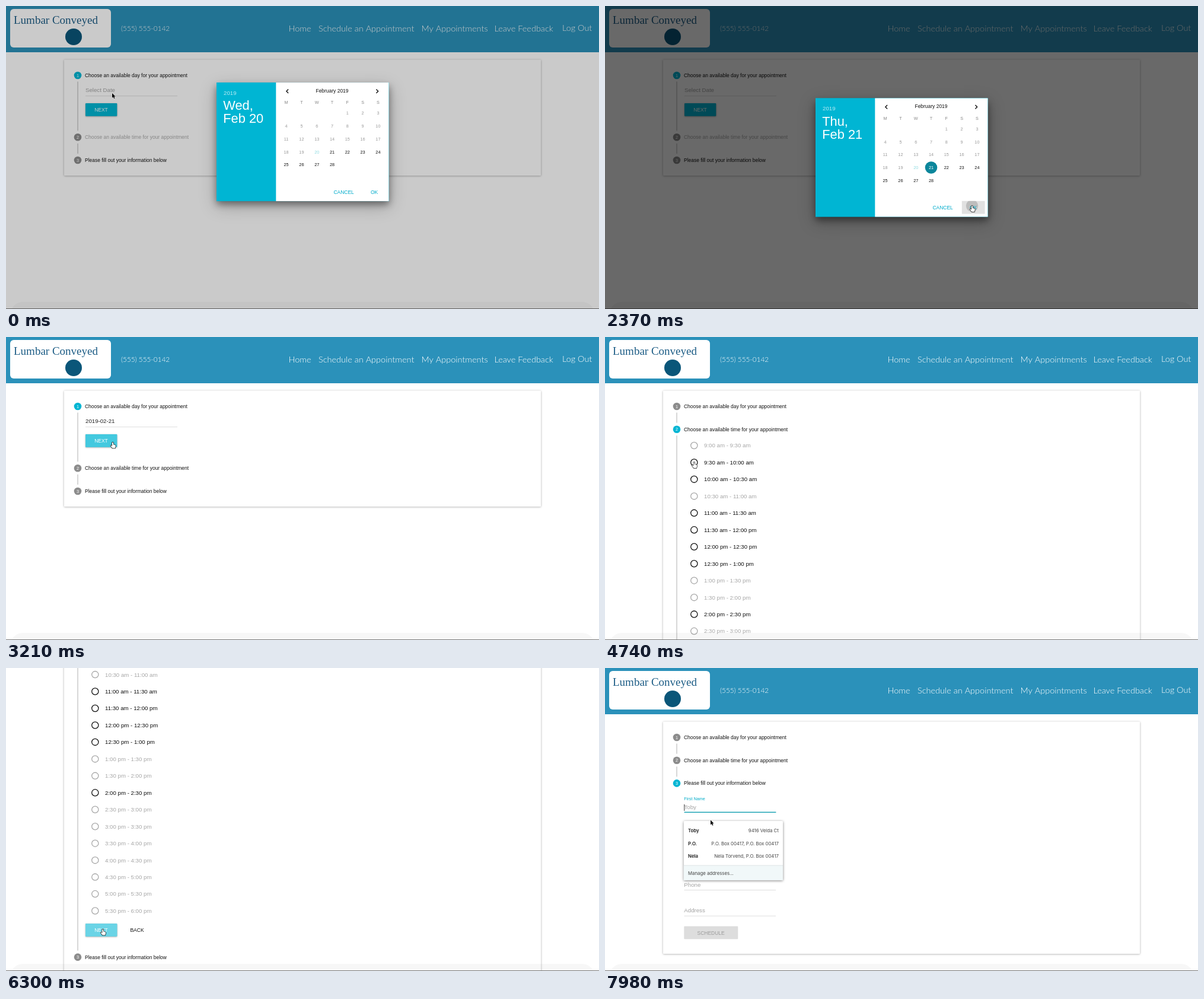
An HTML page with a canvas for the animation above (8 s loop, 1000x511 px).

```html
<!DOCTYPE html>
<html lang="en">
<head>
<meta charset="utf-8">
<title>Appointment booking</title>
<style>
html, body { margin: 0; width: 100%; height: 100%; overflow: hidden; background: #fff; }
canvas { display: block; width: 100%; height: 100%; }
</style>
</head>
<body>
<canvas id="stage" width="1000" height="511"></canvas>
<script>
const ctx = document.getElementById('stage').getContext('2d');
const LOOP = 8000;
const SANS = '"Liberation Sans", Arial, sans-serif';
const NAV = 'Lato, sans-serif';
const SERIF = '"Liberation Serif", serif';
const POPUP = 'Inter, sans-serif';
const CYAN = '#00b5d3', BAR = '#2b91ba', BLACK = '#111', HINT = '#a2a2a2', RULE = '#dedede';
const SMALL = 7.27, BODY = 8.47, LARGE = 9.69;

// Moments of the interaction, in ms
const OPEN = -34, PICK_DAY = 1290, CONFIRM = 2310, CLOSE = 2430;
const TO_TIMES = 3300, PICK_TIME = 4970, TO_FORM = 6330, FOCUS = 7590, SUGGEST = 7700;

const clamp = v => Math.max(0, Math.min(1, v));
const lerp = (a, b, k) => a + (b - a) * k;
const smooth = k => k * k * (3 - 2 * k);

// cubic-bezier(.23, 1, .32, 1)
function easeOut(x) {
  x = clamp(x);
  let lo = 0, hi = 1;
  for (let i = 0; i < 20; i++) {
    const s = (lo + hi) / 2, r = 1 - s;
    if (3 * r * r * s * .23 + 3 * r * s * s * .32 + s * s * s < x) lo = s; else hi = s;
  }
  return 1 - (1 - lo) ** 3;
}
const since = (t, start, length = 450) => easeOut((t - start) / length);

function text(str, x, middle, size, color = BLACK, { align = 'left', font = SANS, weight = 400 } = {}) {
  ctx.font = `${weight} ${size}px ${font}`;
  ctx.textAlign = align;
  ctx.fillStyle = color;
  ctx.fillText(str, x, middle + size * .355);
}
const centered = (str, x, y, size, color) => text(str, x, y, size, color, { align: 'center' });

function rect(x, y, w, h, color) {
  ctx.fillStyle = color;
  ctx.fillRect(x, y, w, h);
}
function round(x, y, w, h, r, color) {
  ctx.beginPath();
  ctx.roundRect(x, y, w, h, r);
  ctx.fillStyle = color;
  ctx.fill();
}
function disc(x, y, r, color) {
  ctx.beginPath();
  ctx.arc(x, y, r, 0, 7);
  ctx.fillStyle = color;
  ctx.fill();
}
function shadowed(dy, blur, color, draw) {
  ctx.save();
  ctx.shadowOffsetY = dy;
  ctx.shadowBlur = blur;
  ctx.shadowColor = color;
  draw();
  ctx.restore();
}
function clipped(x, y, w, h, draw) {
  ctx.save();
  ctx.beginPath();
  ctx.rect(x, y, w, h);
  ctx.clip();
  draw();
  ctx.restore();
}

function header() {
  rect(0, 0, 1000, 78, BAR);
  round(7, 5, 170, 65, 6, '#fff');
  text('Lumbar Conveyed', 13, 23.5, 19, '#1d5d86', { font: SERIF });
  disc(114, 52, 14, '#0a5679');
  text('(555) 555-0142', 194, 37.8, 11.8, '#fff', { font: NAV, weight: 300 });
  const links = [['Home', 476.5, 38], ['Schedule an Appointment', 527, 38], ['My Appointments', 700.5, 38],
    ['Leave Feedback', 823.5, 38], ['Log Out', 938, 37.2]];
  for (const [label, x, y] of links) text(label, x, y, 14.5, '#fff', { font: NAV, weight: 300 });
}

function badge(n, y, active) {
  disc(121, y, 6.3, active ? CYAN : '#8c8c8c');
  centered(n, 121, y, SMALL, '#fff');
}

function nextButton(y, hover) {
  shadowed(.8, 2.5, 'rgba(0,0,0,.35)', () => round(134, y - 11, 53.3, 21.8, 1, CYAN));
  round(134, y - 11, 53.3, 21.8, 1, `rgba(255,255,255,${.43 * hover})`);
  centered('NEXT', 160.5, y, BODY, '#fff');
}

function dayStep(t, y) {
  const chosen = t >= CLOSE;
  text(chosen ? '2019-02-21' : 'Select Date', 134, y + 25, LARGE, chosen ? '#222' : HINT);
  rect(134, y + 34.2, 155, 1, RULE);
  nextButton(y + 58, since(t, 3135));
}

function slotName(i) {
  const clock = n => {
    const hour = 9 + (n >> 1);
    return `${(hour - 1) % 12 + 1}:${n % 2 ? '30' : '00'} ${hour < 12 ? 'am' : 'pm'}`;
  };
  return `${clock(i)} - ${clock(i + 1)}`;
}

function timeStep(t, top) {
  const free = [1, 2, 4, 5, 6, 7, 10];
  for (let i = 0; i < 18; i++) {
    const y = top + 27.3 + i * 28.46;
    const checked = i === 1 && t >= PICK_TIME;
    const color = free.includes(i) ? '#0c0c0c' : '#a6a6a6';
    if (checked) {
      const k = since(t, PICK_TIME);
      disc(150.3, y, 14.5 * k, `rgba(0,181,211,${.3 * (1 - k)})`);
      disc(150.3, y, 3 * k, CYAN);
    }
    ctx.beginPath();
    ctx.arc(150.3, y, 5.6, 0, 7);
    ctx.lineWidth = 1.3;
    ctx.strokeStyle = checked ? CYAN : color;
    ctx.stroke();
    text(slotName(i), 167, y, LARGE, color);
  }
  nextButton(top + 543.5, since(t, 6080));
  centered('BACK', 221, top + 544, BODY, BLACK);
}

function formStep(t, top) {
  const focus = since(t, FOCUS);
  ['First Name', 'Last Name', 'Email', 'Phone', 'Address'].forEach((label, i) => {
    const y = top + 40 + i * 43.65;
    const up = i ? 0 : focus;
    text(label, 133.3, y - 13.8 * up, lerp(LARGE, SMALL, up), up > 0 ? '#00acc8' : HINT);
    rect(133.5, y + 8.7, 154.7, 1, RULE);
  });
  if (focus > 0) {
    const y = top + 40;
    ctx.globalAlpha = focus;
    text('Toby', 133.5, y, LARGE, HINT);
    ctx.globalAlpha = 1;
    rect(133.3, y - 4.5, 1, 11, '#333');
    rect(211 - 77.4 * focus, y + 8.2, 154.8 * focus, 1.4, '#12a0b2');
  }
  round(133.3, top + 241, 91, 21.8, 1, '#dddddd');
  centered('SCHEDULE', 178.6, top + 252.2, BODY, '#9b9b9b');
}

function suggestions() {
  shadowed(1, 4, 'rgba(0,0,0,.5)', () => round(132.8, 258, 167.2, 99.8, 1.5, '#fff'));
  const rows = [['Toby', '9416 Velda Ct'], ['P.O.', 'P.O. Box 00417, P.O. Box 00417'], ['Nela', 'Nela Torvend, P.O. Box 00417']];
  rows.forEach(([name, address], i) => {
    const y = 274 + i * 21.8;
    text(name, 140, y, 7.8, '#1c1c1c', { font: POPUP, weight: 600 });
    text(address, 292.8, y, 7.8, '#444', { font: POPUP, align: 'right' });
  });
  rect(132.8, 333, 167.2, 24.8, '#f1f8f9');
  rect(132.8, 332.6, 167.2, .8, '#d8dddf');
  text('Manage addresses…', 140, 346, 7.8, '#444', { font: POPUP });
}

function page(t) {
  const times = since(t, TO_TIMES), form = since(t, TO_FORM);
  const step = t < TO_TIMES ? 1 : t < TO_FORM ? 2 : 3;
  const heights = [65.6 * (1 - times), 550.5 * times * (1 - form), 261.6 * form];
  const tops = [117];
  for (let i = 0; i < 2; i++) tops.push(tops[i] + 38.7 + heights[i]);
  const bottom = tops[2] + 26 + heights[2];
  const wanted = 257.4 * smooth(clamp((t - 5200) / 620));
  const scroll = Math.min(wanted, Math.max(0, bottom - 513.6));

  ctx.save();
  ctx.translate(0, -scroll);
  header();
  shadowed(.6, 3.5, 'rgba(0,0,0,.36)', () => round(98, 90.6, 804, bottom - 90.6, 1, '#fff'));
  for (let i = 0; i < 2; i++) rect(120.4, tops[i] + 10.5, 1.3, tops[i + 1] - tops[i] - 21.5, '#c2c2c2');

  const labels = ['Choose an available day for your appointment', 'Choose an available time for your appointment',
    'Please fill out your information below'];
  const contents = [dayStep, timeStep, formStep];
  tops.forEach((y, i) => {
    badge(i + 1, y, step === i + 1);
    text(labels[i], 133, y, BODY, i === 1 && t < CLOSE ? '#a8a8a8' : BLACK);
    if (heights[i] > .5) clipped(128, y + 12, 770, heights[i] + 6, () => contents[i](t, y));
  });
  if (t >= SUGGEST) suggestions();
  ctx.restore();
}

function chevron(x, y, dir) {
  ctx.beginPath();
  ctx.moveTo(x - dir * 1.6, y - 3.2);
  ctx.lineTo(x + dir * 1.6, y);
  ctx.lineTo(x - dir * 1.6, y + 3.2);
  ctx.lineWidth = 1.4;
  ctx.strokeStyle = '#111';
  ctx.stroke();
}

function calendar(t) {
  const box = () => rect(355, 155.5, 290.5, 200, CYAN);
  shadowed(8.5, 27, 'rgba(0,0,0,.25)', box);
  shadowed(6, 11, 'rgba(0,0,0,.4)', box);
  rect(455.3, 155.5, 190.2, 200, '#fff');

  const picked = t >= PICK_DAY;
  text('2019', 367, 172.5, LARGE, 'rgba(255,255,255,.72)');
  text(picked ? 'Thu,' : 'Wed,', 366.3, 194, 21.8, '#fff');
  text(picked ? 'Feb 21' : 'Feb 20', 366.3, 216, 21.8, '#fff');

  chevron(474.5, 170.2, -1);
  chevron(626, 170.2, 1);
  centered('February 2019', 550, 169.3, BODY, BLACK);

  const columnX = c => 472.6 + 25.8 * c;
  [...'MTWTFSS'].forEach((d, c) => centered(d, columnX(c), 189, SMALL, '#858585'));
  for (let day = 1; day <= 28; day++) {
    const cell = day + 3, x = columnX(cell % 7), y = 207.3 + 21.75 * Math.floor(cell / 7);
    let color = day < 20 ? '#999' : day === 20 ? '#8fdce2' : BLACK;
    if (day === 21 && t > 1000) {
      disc(x, y, 10.3, `rgba(12,134,155,${picked ? 1 : .62 * since(t, 1000)})`);
      color = '#fff';
    }
    centered(day, x, y, SMALL, color);
  }

  if (t > 2130) {
    rect(601.8, 328.8, 38.8, 21.8, `rgba(0,0,0,${.12 * since(t, 2130)})`);
    if (t > CONFIRM) clipped(601.8, 328.8, 38.8, 21.8, () =>
      disc(619, 337, Math.min(26, (t - CONFIRM) / 6), 'rgba(0,0,0,.16)'));
  }
  centered('CANCEL', 569.6, 340, BODY, '#00accb');
  centered('OK', 621, 340, BODY, '#00accb');
}

function dialog(t) {
  const visible = 1 - since(t, CLOSE);
  if (visible < .004) return;
  rect(0, 0, 1000, 511, `rgba(0,0,0,${.59 * since(t, OPEN, 400) * visible})`);
  ctx.save();
  ctx.globalAlpha = visible;
  ctx.translate(0, -38.7 * (1 - since(t, OPEN)));
  calendar(t);
  ctx.restore();
}

function bottomEdge() {
  round(8, 499, 984, 40, 26, 'rgba(0,0,0,.03)');
  rect(0, 510, 1000, 1, '#777');
}

// Pointer stops: time, x, y
const STOPS = [[0, 179, 147], [330, 179, 147], [1050, 552, 268], [1560, 552, 268], [2190, 619, 337], [2520, 619, 337],
  [3160, 180, 177.5], [4200, 180, 177.5], [4730, 150.3, 211], [5280, 150.3, 211], [6130, 163.3, 440.5],
  [6580, 163.3, 440.5], [7330, 193, 237], [7690, 193, 237], [7960, 178, 256.5], [LOOP, 178, 256.5]];
const SHAPES = [[0, 'arrow'], [990, 'hand'], [1620, 'arrow'], [2110, 'hand'], [2600, 'arrow'], [3110, 'hand'],
  [3600, 'arrow'], [4660, 'hand'], [5300, 'arrow'], [6070, 'hand'], [6450, 'arrow'], [7380, 'beam'], [7760, 'arrow']];
const POINTERS = {
  arrow: [new Path2D('M0 0V8L1.9 6.3L3.2 9.2L4.5 8.6L3.2 5.8H5.6Z'), '#000', '#fff', .6],
  hand: [new Path2D('M-1 .5Q0-.6 1 .5V3.8L4.3 4.8Q5 5.2 4.8 6.8L4 10H-.6L-3.5 6.2Q-3.5 4.8-2.3 5.2L-1 6.4Z'), '#fff', '#111', 1.4],
  beam: [new Path2D('M-2-5Q0-5 0-4Q0-5 2-5M0-4V4M-2 5Q0 5 0 4Q0 5 2 5'), 'transparent', '#222', .9]
};

function pointer(t) {
  const i = STOPS.findIndex(s => s[0] > t);
  const [t0, x0, y0] = STOPS[i - 1], [t1, x1, y1] = STOPS[i];
  const k = smooth((t - t0) / (t1 - t0));
  const shape = SHAPES.filter(s => s[0] <= t).pop()[1];
  const [path, fill, stroke, width] = POINTERS[shape];
  ctx.save();
  ctx.translate(lerp(x0, x1, k), lerp(y0, y1, k));
  ctx.fillStyle = fill;
  ctx.strokeStyle = stroke;
  ctx.lineWidth = width;
  ctx.lineJoin = 'round';
  ctx.stroke(path);
  ctx.fill(path);
  ctx.restore();
}

function frame() {
  const t = performance.now() % LOOP;
  rect(0, 0, 1000, 511, '#fff');
  page(t);
  bottomEdge();
  dialog(t);
  pointer(t);
  requestAnimationFrame(frame);
}
frame();
</script>
</body>
</html>
```
